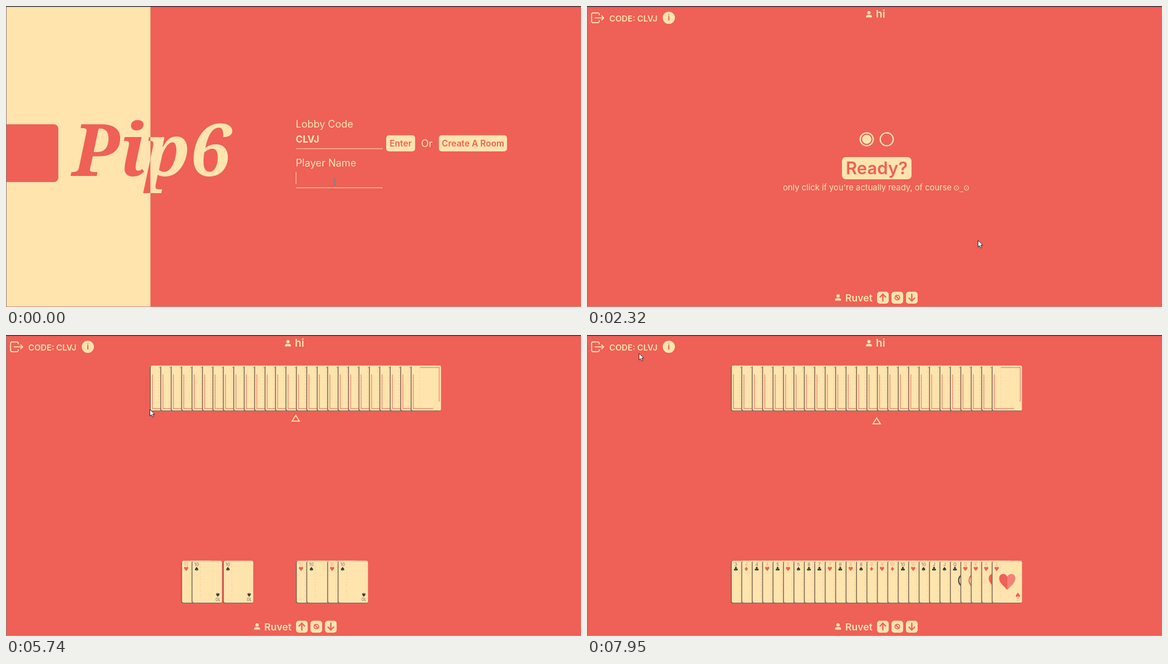
Write an HTML page with a canvas that moves like this. It is 1033 by 542 pixels and loops after 8 s.

```html
<!DOCTYPE html>
<html lang="en">
<head>
<meta charset="utf-8">
<title>Card lobby</title>
<style>
  html, body { margin: 0; width: 100%; height: 100%; overflow: hidden; background: #ef6056; }
  canvas { display: block; }
</style>
</head>
<body>
<canvas id="stage" width="1033" height="542"></canvas>
<script>
const ctx = document.getElementById('stage').getContext('2d');
const LOOP = 8000, W = 1033, H = 542;
const RED = '#ef6056', CREAM = '#ffe4ae', DARK = '#3b3a3c', IBEAM = '#6b8783';
const PLAYER = 'Ruvet', CODE = 'CLVJ', TITLE = 'Pip6';
const SANS = 'Inter, "Open Sans", sans-serif';
const SYMBOLS = '"DejaVu Sans", sans-serif';

const HAND = '3♣ 4♦ 4♣ 4♥ 5♣ 5♥ 5♠ 6♣ 7♣ 7♥ 8♣ 8♥ 8♠ 9♦ 9♥ 10♦ 10♣ 10♥ 10♠ J♣ J♠ Q♣ Q♥ K♥ A♥ 2♥'.split(' ');
const FIRST_DEALT = { 3: '10♥', 4: '10♠', 7: '10♠', 14: '10♥', 15: '10♠', 17: '10♥', 18: '10♠' };
const CARD_W = 53, HAND_X = 260, HAND_Y = 406.5, HAND_H = 75.5, STEP = 18.74;

// Pointer path: time, x, y
const PATH = [
  [1380, 590, 317], [1700, 714, 250], [2160, 714, 250], [2320, 702, 422],
  [2900, 702, 422], [3610, 514, 294], [4050, 514, 294], [4760, 515, 389],
  [4860, 515, 389], [5610, 258, 134], [5740, 258, 134], [6470, 130, 10],
  [6530, 130, 10], [6950, 764, 280], [7110, 709, 410], [7290, 700, 428],
  [7950, 93, 33]
];

const ramp = (t, a, b) => {
  const u = Math.min(1, Math.max(0, (t - a) / (b - a)));
  return u * u * (3 - 2 * u);
};

function pointerAt(t) {
  const i = PATH.findIndex(p => p[0] > t);
  if (i < 0) return PATH[PATH.length - 1].slice(1);
  const [t0, x0, y0] = PATH[i - 1], [t1, x1, y1] = PATH[i], u = ramp(t, t0, t1);
  return [x0 + (x1 - x0) * u, y0 + (y1 - y0) * u];
}

function text(str, x, y, size, { weight = 400, color = CREAM, align = 'left', family = SANS, base = 'alphabetic' } = {}) {
  ctx.font = `${weight} ${size}px ${family}`;
  ctx.fillStyle = color;
  ctx.textAlign = align;
  ctx.textBaseline = base;
  ctx.fillText(str, x, y);
  return ctx.measureText(str).width;
}

function rect(x, y, w, h, r, color) {
  ctx.fillStyle = color;
  ctx.beginPath();
  ctx.roundRect(x, y, w, h, r);
  ctx.fill();
}

function disc(x, y, r, color) {
  ctx.fillStyle = color;
  ctx.beginPath();
  ctx.arc(x, y, r, 0, 7);
  ctx.fill();
}

function ring(x, y, r, color, width) {
  ctx.strokeStyle = color;
  ctx.lineWidth = width;
  ctx.beginPath();
  ctx.arc(x, y, r, 0, 7);
  ctx.stroke();
}

function line(color, width, ...points) {
  ctx.strokeStyle = color;
  ctx.lineWidth = width;
  ctx.beginPath();
  points.forEach(([x, y]) => ctx.lineTo(x, y));
  ctx.stroke();
}

function button(label, cx, cy, w, h, size, scale = 1, bg = CREAM, fg = RED) {
  ctx.save();
  ctx.translate(cx, cy);
  ctx.scale(scale, scale);
  rect(-w / 2, -h / 2, w, h, h > 35 ? 7 : 5, bg);
  text(label, 0, size * 0.36, size, { weight: 600, color: fg, align: 'center' });
  ctx.restore();
}

function login(t) {
  const split = 259.5;
  rect(0, 0, split, H, 0, CREAM);
  rect(-10, 213, 104, 104, 8, RED);
  [[0, split, RED], [split, W - split, CREAM]].forEach(([x, w, color]) => {
    ctx.save();
    ctx.beginPath();
    ctx.rect(x, 0, w, H);
    ctx.clip();
    text(TITLE, 119, 306, 129, { weight: 'italic 600', color, family: '"Noto Serif", serif' });
    ctx.restore();
  });

  text('Lobby Code', 520.5, 219, 18);
  if (t < 1780) text(CODE, 520.5, 246, 17.2, { weight: 700 });
  rect(521, 256.6, 156, 1, 0, CREAM);
  text('Player Name', 520.5, 289, 18.2);
  rect(521, 326.7, 156, 1, 0, CREAM);

  const typed = t < 550 ? 0 : Math.min(5, 1 + Math.floor((t - 550) / 90));
  const width = text(PLAYER.slice(0, typed), 520.5, 316.5, 17.4, { weight: 700 });
  if (t < 1700) rect(520.5 + Math.min(width, 49.5), 299, 1, 22, 0, CREAM);

  const hover = ramp(t, 1600, 1740);
  button('Enter', 709, 247.3, 52, 29, 15.6, 1 + 0.045 * hover, hover > 0.5 ? '#ecca8d' : CREAM);
  text('Or', 756, 254, 18, { align: 'center' });
  button('Create A Room', 838.9, 247.3, 122.4, 29, 15.6);

  if (t < 150) {
    line(IBEAM, 1.4, [590.3, 312], [590.3, 323]);
    line(IBEAM, 1.2, [587.5, 311.5], [593, 311.5]);
    line(IBEAM, 1.2, [587.5, 322.5], [593, 322.5]);
  }
}

function person(x, y) {
  disc(x, y - 3, 3, CREAM);
  rect(x - 5.5, y + 1, 11, 4.5, [4, 4, 0, 0], CREAM);
}

function arrow(x, y, dir) {
  line(RED, 2.4, [x, y - 6 * dir], [x, y + 6 * dir]);
  line(RED, 2.4, [x - 5, y - dir], [x, y - 6 * dir], [x + 5, y - dir]);
}

function roomFrame() {
  ctx.lineCap = ctx.lineJoin = 'round';
  line(CREAM, 1.8, [22, 16], [22, 14], [20, 12.5], [10, 12.5], [8.3, 14], [8.3, 28.5], [10, 30], [20, 30], [22, 28.5], [22, 26.5]);
  line(CREAM, 1.8, [14.5, 21.3], [30, 21.3]);
  line(CREAM, 1.8, [26.5, 17.8], [30, 21.3], [26.5, 24.8]);
  text('CODE: ' + CODE, 40, 27.5, 14.8, { weight: 600 });
  disc(147, 21.3, 11, CREAM);
  text('i', 147, 26, 13.5, { weight: 700, color: RED, align: 'center' });

  person(506.5, 15);
  text('hi', 519, 21, 19, { weight: 600 });
  person(451, 525);
  text(PLAYER, 464, 531.5, 17.6, { weight: 600 });
  [521, 547, 573].forEach(x => rect(x, 514.5, 21, 21.5, 5, CREAM));
  arrow(531.5, 525, 1);
  ring(557.5, 525, 4.2, RED, 1.8);
  line(RED, 1.8, [554.6, 522], [560.4, 528]);
  arrow(583.5, 525, -1);
  ctx.lineCap = 'butt';
  ctx.lineJoin = 'miter';
}

function readyPanel(t) {
  [502.5, 538.5].forEach(x => ring(x, 240, 11.7, CREAM, 2.3));
  disc(502.5, 240, 8.3, CREAM);
  if (t > 4110) disc(538.5, 240, 8.3, CREAM);
  const hover = ramp(t, 3340, 3500) - ramp(t, 4200, 4340);
  button('Ready?', 520.5, 292, 125, 40, 31, 1 + 0.105 * hover, CREAM, hover > 0.5 ? '#df584d' : RED);
  text("only click if you're actually ready, of course", 352, 332, 14.75);
  text('⊙_⊙', 658, 332, 13.5, { family: SYMBOLS });
}

function cardBase(x, y, h) {
  rect(x - 1.5, y + 1, CARD_W, h, 3, '#77614f');
  rect(x, y, CARD_W, h, 3, CREAM);
  ctx.setLineDash([1, 3, 2, 5]);
  line('rgba(205,170,105,.5)', 1, [x + 14.5, y + 6], [x + 14.5, y + h - 5]);
  ctx.setLineDash([]);
}

function cardBack(x) {
  cardBase(x, 55, 81);
  line('#f28873', 1.4, [x + 3.2, 71], [x + 3.2, 132.5], [x + 39, 132.5]);
  line('#f28873', 1.4, [x + 15, 58.5], [x + 49.8, 58.5], [x + 49.8, 120]);
}

function halfHeart(x, y, side, color) {
  ctx.fillStyle = color;
  ctx.beginPath();
  ctx.moveTo(x, y - 9);
  ctx.bezierCurveTo(x + 5 * side, y - 17, x + 15 * side, y - 14, x + 14.5 * side, y - 5);
  ctx.bezierCurveTo(x + 14 * side, y + 3, x + 6 * side, y + 8, x, y + 15);
  ctx.fill();
}

function cardFront(name, x, hovered) {
  const rank = name.slice(0, -1), suit = name.slice(-1);
  const isRed = '♥♦'.includes(suit), color = isRed ? RED : DARK;
  cardBase(x, HAND_Y, HAND_H);
  const corner = (cx, cy, angle) => {
    ctx.save();
    ctx.translate(cx, cy);
    ctx.rotate(angle);
    text(rank, 0, -8.5, 8, { color: isRed ? '#f4a27d' : '#786e5d', align: 'center', base: 'middle' });
    text(suit, 0, 0, 10.5, { color, align: 'center', base: 'middle', family: SYMBOLS });
    ctx.restore();
  };
  corner(x + 7.5, 422, 0);
  corner(x + 45.5, 466.5, Math.PI);

  if (rank === 'Q') ring(x + 26.5, 442, 12.3, color, 2);
  if (rank === 'A' || rank === '2') {
    halfHeart(x + 26.5, 444, -1, RED);
    halfHeart(x + 26.5, 444, 1, '#f48074');
  }
  if (hovered) rect(x, HAND_Y, CARD_W, HAND_H, 3, 'rgba(100,75,30,.2)');
}

function table(t, [px, py]) {
  for (let i = 0; i < 26; i++) cardBack(HAND_X + STEP * i);
  const overHand = py >= HAND_Y && py <= HAND_Y + HAND_H && px >= HAND_X;
  const over = overHand ? Math.min(25, Math.floor((px - HAND_X) / STEP)) : -1;
  HAND.forEach((name, i) => {
    const shown = t < 5800 ? FIRST_DEALT[i] : name;
    if (shown) cardFront(shown, HAND_X + STEP * i, i === over);
  });
  const y = 150 + 2.4 * (1 - Math.cos((t - 5670) / 1500 * 2 * Math.PI));
  ctx.strokeStyle = CREAM;
  ctx.lineWidth = 1.8;
  ctx.beginPath();
  ctx.moveTo(520.5, y - 5.5);
  ctx.lineTo(527, y + 5);
  ctx.lineTo(514, y + 5);
  ctx.closePath();
  ctx.stroke();
}

function pointer([x, y]) {
  ctx.save();
  ctx.translate(x + 0.5, y);
  ctx.beginPath();
  [[0, 0], [0, 12], [2.8, 9.6], [4.8, 13.8], [6.8, 12.9], [4.9, 8.8], [8.6, 8.6]].forEach(([a, b]) => ctx.lineTo(a, b));
  ctx.closePath();
  ctx.fillStyle = '#fff';
  ctx.strokeStyle = '#222';
  ctx.lineWidth = 1;
  ctx.fill();
  ctx.stroke();
  ctx.restore();
}

function draw(t) {
  rect(0, 0, W, H, 0, RED);
  const pos = t < 1380 ? null : pointerAt(t);
  if (t < 1900) login(t);
  if (t >= 2160) {
    roomFrame();
    if (t < 4860) readyPanel(t);
    if (t >= 5670) table(t, pos);
  }
  // Window edges
  rect(0, 541, W, 1, 0, '#d98a80');
  rect(0, 0, 1, H, 0, '#857472');
  rect(0, 0, W, 1.4, 0, '#30313f');
  if (pos) pointer(pos);
}

const start = performance.now();
function tick() {
  draw((performance.now() - start) % LOOP);
  requestAnimationFrame(tick);
}
tick();
</script>
</body>
</html>
```
